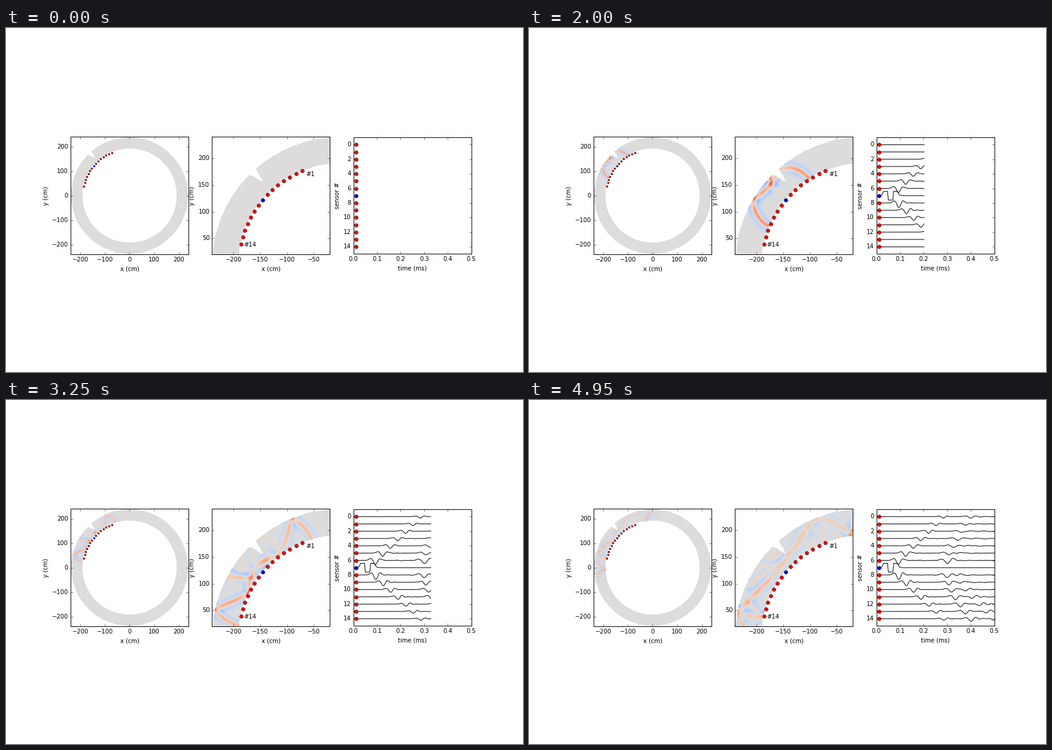
A matplotlib script for the animation above (5000 ms loop, 864 by 576 pixels).

```python
import numpy as np
import matplotlib.pyplot as plt
from matplotlib.animation import FuncAnimation

plt.style.use("classic")
plt.rcParams.update({
    "font.family": "DejaVu Sans",
    "font.size": 10,
    "axes.labelsize": 10,
    "xtick.labelsize": 10,
    "ytick.labelsize": 10,
    "figure.subplot.bottom": 0.125,
    "figure.facecolor": "white",
})

FRAMES, INTERVAL = 100, 50
T_END = 0.5          # ms
SPEED = 430.0        # cm per ms
FREQ = 20.0          # kHz
R_IN, R_OUT = 190, 240
SUBSTEPS = 4
CLIP = 0.6
SOURCE = 7

# Sensors on the inner wall
theta = np.radians(np.linspace(112, 168, 15))
sx, sy = R_IN * np.cos(theta), R_IN * np.sin(theta)

# Ring with a wedge-shaped notch, 1 cm grid
axis = np.arange(-R_OUT, R_OUT + 1)
X, Y = np.meshgrid(axis, axis)
R = np.hypot(X, Y)


def half_plane(p, q):
    return (q[0] - p[0]) * (Y - p[1]) - (q[1] - p[1]) * (X - p[0]) > 0


tip, left, right = (-145, 156), (-170, 171), (-159, 180)
notch = half_plane(left, tip) & half_plane(tip, right)
solid = (R >= R_IN - 0.5) & (R <= R_OUT + 0.3) & ~notch


def ricker(t):
    a = (np.pi * FREQ * (t - 1.2 / FREQ)) ** 2
    return (1 - 2 * a) * np.exp(-a)


def simulate():
    """Scalar wave with free edges, driven at the source sensor."""
    dt = T_END / (FRAMES - 1) / SUBSTEPS
    steps = (FRAMES - 1) * SUBSTEPS
    c2 = np.float32((SPEED * dt) ** 2)
    link_x = (solid[:, 1:] & solid[:, :-1]) * c2
    link_y = (solid[1:] & solid[:-1]) * c2
    col = np.rint((R_IN + 1) * np.cos(theta)).astype(int) + R_OUT
    row = np.rint((R_IN + 1) * np.sin(theta)).astype(int) + R_OUT

    u = np.zeros(solid.shape, np.float32)
    prev = u.copy()
    fields = np.zeros((FRAMES,) + solid.shape, np.float32)
    traces = np.zeros((steps + 1, len(theta)))
    for n in range(1, steps + 1):
        nxt = 2 * u - prev
        flux = link_x * np.diff(u, axis=1)
        nxt[:, :-1] += flux
        nxt[:, 1:] -= flux
        flux = link_y * np.diff(u, axis=0)
        nxt[:-1] += flux
        nxt[1:] -= flux
        nxt[row[SOURCE], col[SOURCE]] = ricker(n * dt)
        prev, u = u, nxt
        traces[n] = u[row, col]
        if n % SUBSTEPS == 0:
            fields[n // SUBSTEPS] = u

    gain = 0.57 / traces[:, SOURCE - 1].max()
    times = np.arange(steps + 1) * dt
    traces *= gain
    traces[:, SOURCE] = 3.4 * ricker(times)
    return times, fields * np.float32(gain), np.clip(traces, -CLIP, CLIP)


times, fields, traces = simulate()

fig = plt.figure(figsize=(12, 8), dpi=72)
ring_ax, zoom_ax, trace_ax = (fig.add_subplot(1, 3, k) for k in (1, 2, 3))


def dots(ax, x, y, size):
    colors = ["b" if i == SOURCE else "r" for i in range(len(x))]
    for px, py, color in zip(x, y, colors):
        ax.plot([px], [py], "o", color=color, ms=size, mec="k", mew=0.5,
                zorder=4)


def field_panel(ax, xlim, ylim, ticks, size):
    edge = R_OUT + 0.5
    img = ax.imshow(np.ma.array(fields[0], mask=~solid), cmap="coolwarm",
                    vmin=-0.5, vmax=0.5, origin="lower",
                    extent=(-edge, edge, -edge, edge))
    dots(ax, sx, sy, size)
    ax.set(xlim=xlim, ylim=ylim, xticks=ticks[0], yticks=ticks[1],
           xlabel="x (cm)", ylabel="y (cm)")
    return img


wide = range(-200, 201, 100)
images = [
    field_panel(ring_ax, (-240, 240), (-240, 240), (wide, wide), 3),
    field_panel(zoom_ax, (-240, -20), (20, 240),
                (range(-200, -49, 50), range(50, 201, 50)), 6),
]
zoom_ax.text(sx[0] + 6, sy[0] - 10, "#1")
zoom_ax.text(sx[-1] + 5, sy[-1] - 4.5, "#14")

rows = np.arange(len(theta))
lines = [trace_ax.plot([], [], "k-", lw=1)[0] for _ in rows]
dots(trace_ax, np.full(len(rows), 0.012), rows, 6)
trace_ax.set(xlim=(0, T_END), ylim=(15, -1), yticks=range(0, 15, 2),
             xticks=np.arange(6) / 10, xlabel="time (ms)", ylabel="sensor #")
trace_ax.set_aspect(0.031)


def update(frame):
    for img in images:
        img.set_data(np.ma.array(fields[frame], mask=~solid))
    end = frame * SUBSTEPS + 1 if frame else 0
    for i, line in enumerate(lines):
        line.set_data(times[:end], i + traces[:end, i])
    return images + lines


anim = FuncAnimation(fig, update, frames=FRAMES, interval=INTERVAL,
                     repeat=True, repeat_delay=0, blit=False)
plt.show()
```
